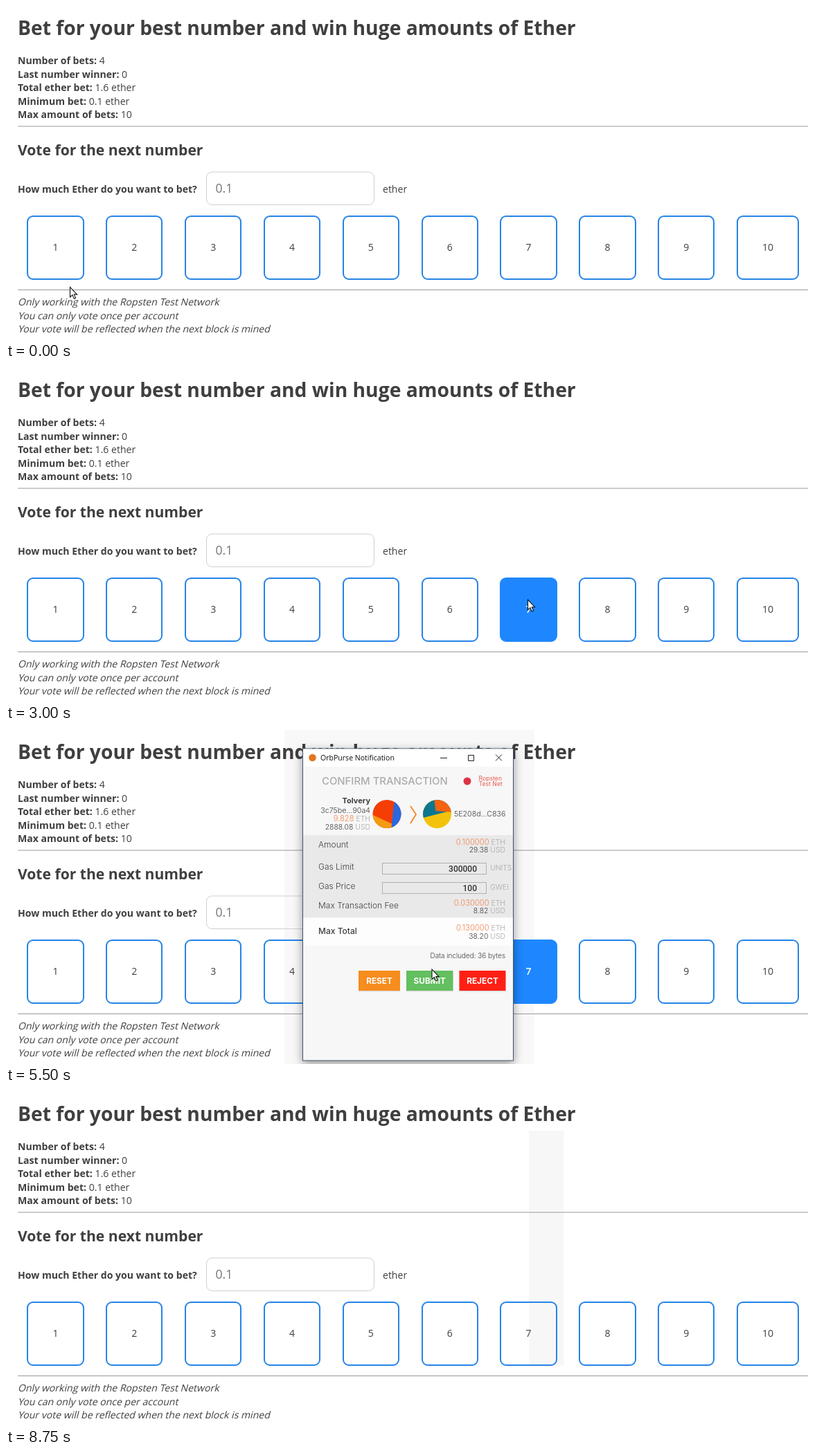
An HTML page for the animation above (10 s loop, 1158x483 px).

```html
<!DOCTYPE html>
<html lang="en">
<head>
<meta charset="utf-8">
<title>Number betting</title>
<style>
html, body { margin: 0; width: 100%; height: 100%; overflow: hidden; background: #fff; }
svg { display: block; width: 100%; height: 100%; font: 14.08px "Open Sans", sans-serif; fill: #3f3f3f; }
text { white-space: pre; }
.b { font-weight: 700; }
.box { stroke: #2684e8; stroke-width: 2; fill: none; }
.lit .box { fill: #1e87ff; stroke: #1e87ff; }
.lit text { fill: #fff; font-weight: 600; }
.window { filter: drop-shadow(0 4px 7px rgba(0, 0, 0, .4)); }
.wallet { font: 300 10.4px Inter, sans-serif; }
.wallet .label { font-size: 12px; font-weight: 300; }
.wallet .strong { font-size: 12px; font-weight: 500; }
.wallet .name { font-size: 11px; font-weight: 700; }
.wallet .account { font-size: 10.7px; }
.wallet .field { font: 500 12px Roboto, sans-serif; fill: #333; }
.wallet .press { font-size: 11.8px; font-weight: 700; fill: #fff; }
.wallet .caption { font: 10.56px "Open Sans", sans-serif; fill: #111; }
.wallet .head { font-size: 14.9px; font-weight: 500; fill: #ababab; }
.wallet .net { font-size: 8.7px; font-weight: 400; fill: #ea5a50; }
.unit { fill: #a6a6a6; }
.eth { font-size: 11.2px; fill: #f5824d; }
</style>
</head>
<body>
<svg id="stage" viewBox="0 0 1158 483"></svg>
<script>
const LOOP = 10000, STEP = 250;
const BOX_LEFT = 30.4, BOX_PITCH = 113.85, BOX_WIDTH = 82.2;

const text = (x, y, str, cls = "", anchor = "start", extra = "") =>
  `<text x="${x}" y="${y}" class="${cls}" text-anchor="${anchor}" ${extra}>${str}</text>`;
const rect = (x, y, w, h, fill, extra = "") =>
  `<rect x="${x}" y="${y}" width="${w}" height="${h}" fill="${fill}" ${extra}/>`;
const path = (d, fill, extra = "") => `<path d="${d}" fill="${fill}" ${extra}/>`;
const group = (id, body, extra = "") => `<g id="${id}" ${extra}>${body}</g>`;

// Page
const facts = [
  ["Number of bets", "4"], ["Last number winner", "0"], ["Total ether bet", "1.6 ether"],
  ["Minimum bet", "0.1 ether"], ["Max amount of bets", "10"],
];
const notes = [
  "Only working with the Ropsten Test Network",
  "You can only vote once per account",
  "Your vote will be reflected when the next block is mined",
];
const lineY = (top, i) => Math.round(top + i * 19.5);

// Slanted upright letters, wider than the true italic.
const slanted = (x, y, str) =>
  text(0, 0, str, "", "start", `transform="translate(${x} ${y}) skewX(-14)"`);

function numberBox(n) {
  const x = BOX_LEFT + (n - 1) * BOX_PITCH, w = n === 10 ? 90 : BOX_WIDTH;
  const left = Math.round(x), right = Math.round(x + w);
  return group("number" + n,
    `<rect class="box" x="${left + 1}" y="304" width="${right - left - 2}" height="91" rx="8"/>` +
    text(x + w / 2, 354, n, "", "middle"));
}

function page() {
  const numbers = Array.from({ length: 10 }, (_, i) => numberBox(i + 1)).join("");
  return text(17, 42, "Bet for your best number and win huge amounts of Ether", "b", "start", 'font-size="28.25"') +
    facts.map(([key, value], i) =>
      text(17, lineY(84, i), `<tspan class="b">${key}:</tspan> ${value}`)).join("") +
    rect(17, 173.5, 1141, 1, "#9a9a9a") +
    text(17, 216, "Vote for the next number", "b", "start", 'font-size="21.12"') +
    text(17, 269.5, "How much Ether do you want to bet?", "b") +
    rect(289.5, 240, 242, 47.5, "none", 'rx="8" stroke="#cfcfcf"') +
    text(302.5, 270, "0.1", "", "start", 'font-size="17.6" style="fill:#757575"') +
    text(544, 269.5, "ether") +
    numbers +
    rect(17, 410, 1141, 1, "#9a9a9a") +
    notes.map((line, i) => slanted(17, lineY(433, i), line)).join("");
}

// Wallet window
const amount = (right, y, value, unit, cls = "") =>
  text(right, y, `<tspan class="${cls}">${value}</tspan> <tspan class="unit">${unit}</tspan>`, "", "end");
const cost = (y, eth, usd) => amount(721, y, eth, "ETH", "eth") + amount(721, y + 11.7, usd, "USD");
const field = (y, label, value, unit) =>
  text(451, y, label, "label") +
  rect(543.5, y - 9.5, 150, 16, "none", 'stroke="#b4b0b0"') +
  text(680, y + 2.6, value, "field", "end") + text(699, y + 1, unit, "unit");
const press = (x, w, label, fill, id) =>
  rect(x, 349.5, w, 29, "rgba(0,0,0,.1)") + rect(x, 348, w, 29, fill, `id="${id}"`) +
  text(x + w / 2, 367, label, "press", "middle");
const pie = (id, cx, base, slices) =>
  `<clipPath id="${id}"><circle cx="${cx}" cy="121.5" r="20.5"/></clipPath>
   <g clip-path="url(#${id})">${rect(cx - 21, 100, 42, 43, base)}${slices}</g>`;

function walletContent() {
  return `<g class="wallet">` +
    rect(429, 27.5, 303, 25.5, "#fff") +
    `<circle cx="442.5" cy="40" r="5.3" fill="#e2761b"/>` +
    text(454, 44, "OrbPurse Notification", "caption") +
    path("M627 40.5H637M667.5 36.5H675.5V44.5H667.5ZM707 35.5L716 44.5M716 35.5L707 44.5", "none", 'stroke="#222"') +
    text(456, 79, "CONFIRM TRANSACTION", "head") +
    `<circle cx="666" cy="74" r="5.5" fill="#dc3545"/>` +
    text(682.5, 73, "Ropsten", "net") + text(682.5, 81, "Test Net", "net") +
    text(526, 106, "Tolvery", "name", "end") +
    text(526, 120, "3c75be...90a4", "account", "end") +
    amount(526, 132, "9.828", "ETH", "eth") + amount(526, 144, "2888.08", "USD") +
    pie("sender", 550, "#f53d06",
      path("M528 122L558 136V145H528Z", "#f59a12") + path("M561 99L556 145H575V99Z", "#2b68de")) +
    path("M584 110L592 122L584 135", "none", 'stroke="#f5851f" stroke-width="1.8"') +
    pie("receiver", 622.5, "#f2c20c",
      path("M600 99V127.5L645 116V99Z", "#0d7690") + path("M618 99L620.5 117L645 119V99Z", "#f5640f")) +
    text(647, 124.5, "5E208d...C836", "account") +
    rect(429, 152, 303, 119.5, "#e9e9e9") + rect(429, 271.5, 303, 40.5, "#fdfdfd") +
    text(451, 170, "Amount", "label") + cost(165.7, "0.100000", "29.38") +
    field(202, "Gas Limit", "300000", "UNITS") + field(230, "Gas Price", "100", "GWEI") +
    text(451, 258, "Max Transaction Fee", "label") + cost(253.7, "0.030000", "8.82") +
    text(451, 294.5, "Max Total", "strong") + cost(290, "0.130000", "38.20") +
    text(721, 329.7, "Data included: 36 bytes", "", "end", 'font-size="9.9"') +
    press(509, 60, "RESET", "#f78c1f", "reset") +
    press(578, 67.5, "SUBMIT", "#63bf60", "submit") +
    press(654.5, 67, "REJECT", "#ff2015", "reject") + `</g>`;
}

const arrow = path("M.5 .5V15L3.9 11.9L6.3 17.4L8.6 16.4L6.3 11.1H10.6Z", "#fff", 'stroke="#111" stroke-width="1.1"');
const blocked = `<circle r="6" fill="#fff" stroke="#b30a16" stroke-width="2.2"/>` +
  path("M-4 -4L4 4", "none", 'stroke="#b30a16" stroke-width="2.2"');

document.getElementById("stage").innerHTML =
  group("openTrace", rect(725, 0, 37.5, 423, "#f7f7f7") + rect(806, 233, 167, 20, "#fbfbfb")) +
  group("dragTrace", rect(402, 0, 360.5, 483, "#f8f8f8")) +
  group("closeTrace", rect(755, 56, 50.5, 340, "#f7f7f7")) +
  page() +
  group("popup",
    rect(428.5, 27, 304, 451, "#f7f7f7", 'id="frame" class="window"') +
    group("content", walletContent())) +
  group("arrow", arrow) + group("blocked", blocked);

// Motion: [time, x, y], straight between points
const pointerPath = [
  [0, 92, 406], [250, 190, 380], [750, 520, 372], [1000, 579, 386], [1500, 790, 335],
  [1750, 915, 270], [2000, 961, 234], [2250, 900, 262], [2500, 795, 320], [2750, 757, 342],
  [3500, 745, 320], [4000, 599, 117], [4250, 572, -14], [4750, 580, 41], [5250, 610, 300],
  [5500, 614.5, 345.5], [5750, 621, 358], [7500, 621, 365], [8000, 720, 402], [8500, 1080, 455],
];
const popupPath = [[0, -8, -55], [4250, -8, -55], [4750, 0, 0]];

function follow(points, t) {
  const next = points.findIndex(p => p[0] > t);
  if (next < 0) return points[points.length - 1].slice(1);
  const [t0, x0, y0] = points[next - 1], [t1, x1, y1] = points[next];
  const k = (t - t0) / (t1 - t0);
  return [x0 + (x1 - x0) * k, y0 + (y1 - y0) * k];
}

const el = id => document.getElementById(id);
const show = (id, on) => el(id).setAttribute("visibility", on ? "visible" : "hidden");
const place = (id, [x, y]) => el(id).setAttribute("transform", `translate(${x} ${y})`);

// The hover fill trails the pointer by one step.
function litNumber(t) {
  if (t >= 2750) return t < 8000 ? 7 : 0;
  const [x, y] = follow(pointerPath, Math.max(0, t - STEP));
  const n = Math.floor((x - BOX_LEFT) / BOX_PITCH) + 1;
  return y > 303 && y < 396 && (x - BOX_LEFT) % BOX_PITCH < BOX_WIDTH ? n : 0;
}

function draw(t) {
  const within = (from, to) => t >= from && t < to;
  const refused = within(6000, 7750), lit = litNumber(t);

  for (let n = 1; n <= 10; n++) el("number" + n).setAttribute("class", n === lit ? "lit" : "");

  const popupOpen = within(3500, 7750);
  el("popup").style.display = popupOpen ? "" : "none";
  show("content", within(4250, 7750));
  place("popup", follow(popupPath, t));
  el("frame").setAttribute("stroke", within(4500, 7500) ? "#44546a" : "#35877d");
  el("submit").setAttribute("fill", refused ? "#c5c5c5" : "#63bf60");

  show("openTrace", within(3500, 4500));
  show("dragTrace", within(4500, 7500));
  show("closeTrace", t >= 8750);

  show("arrow", !refused && t < 8750);
  show("blocked", refused);
  place("arrow", follow(pointerPath, t));
  place("blocked", [621.5, 365]);
}

const start = performance.now();
function tick() {
  const t = (performance.now() - start) % LOOP;
  draw(Math.floor(t / STEP) * STEP);
  requestAnimationFrame(tick);
}
tick();
</script>
</body>
</html>
```
